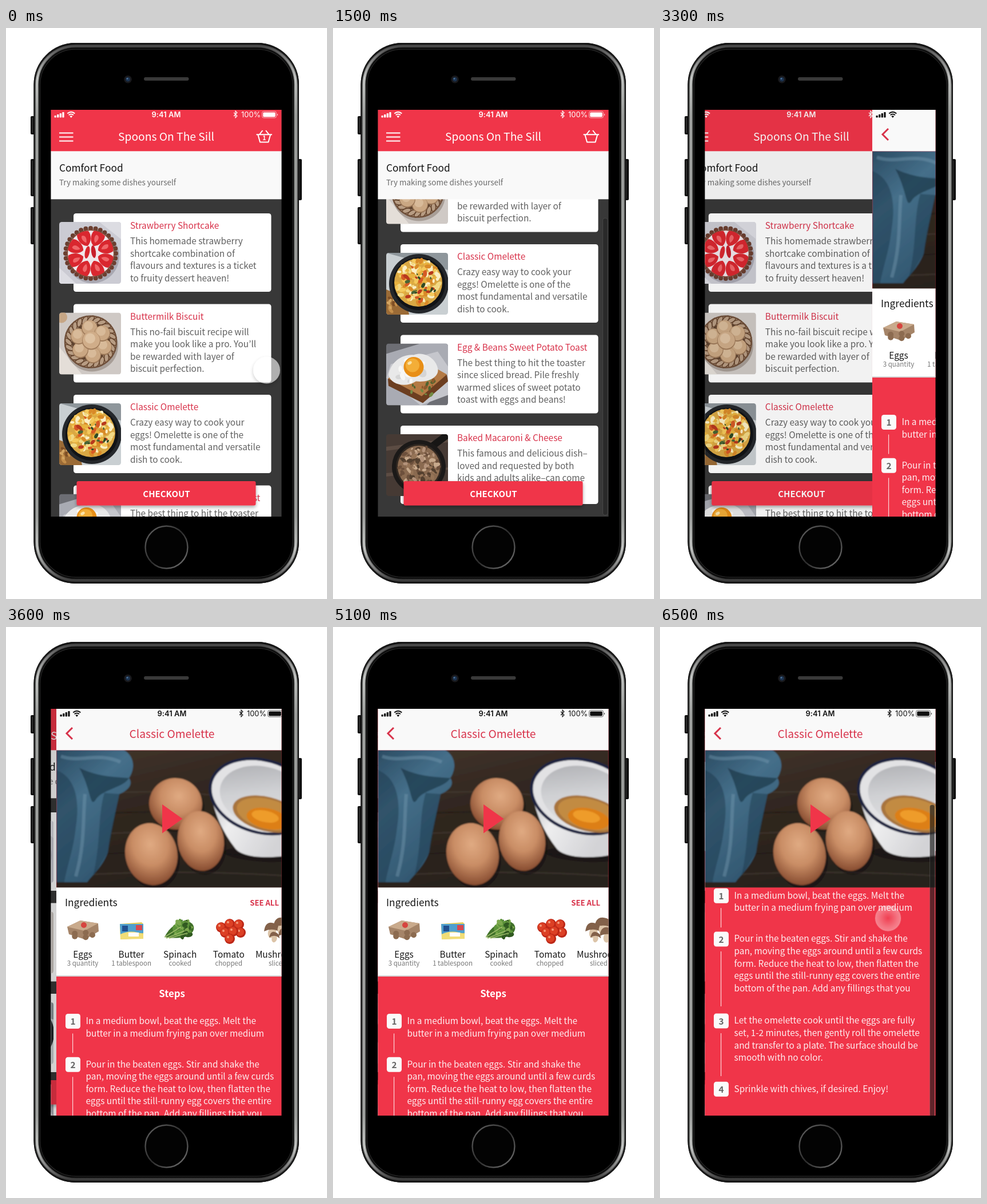
Animation of 561x998 px, one loop 6600 ms. Source, as an HTML page:

```html
<!DOCTYPE html>
<html lang="en">
<head>
<meta charset="utf-8">
<title>Recipe app</title>
<style>
html,body{margin:0;width:100%;height:100%;overflow:hidden;background:#fff}
svg{display:block;width:561px;height:998px}
text{font-family:"Noto Sans CJK KR","Noto Sans CJK SC","Noto Sans CJK JP","Noto Sans CJK",sans-serif}
text.ui{font-family:Inter,"Liberation Sans",sans-serif}
</style>
</head>
<body>
<svg id="stage" viewBox="0 0 561 998" xmlns="http://www.w3.org/2000/svg"></svg>
<script>
const RED = '#f03549', TITLE = '#d8324a', BODY = '#606060', PALE = '#f9f9f9';
const PT = 0.962; // design points to pixels

let seed = 7;
const rnd = () => (seed = seed * 16807 % 2147483647) / 2147483647;

const rect = (x, y, w, h, fill, more = '') => `<rect x="${x}" y="${y}" width="${w}" height="${h}" fill="${fill}" ${more}/>`;
const circ = (x, y, r, fill, more = '') => `<circle cx="${x}" cy="${y}" r="${r}" fill="${fill}" ${more}/>`;
const oval = (x, y, a, b, fill, turn = 0, more = '') =>
  `<ellipse cx="${x}" cy="${y}" rx="${a}" ry="${b}" fill="${fill}" transform="rotate(${turn} ${x} ${y})" ${more}/>`;
const path = (d, fill, more = '') => `<path d="${d}" fill="${fill}" ${more}/>`;
const line = (d, color, w, more = '') => path(d, 'none', `stroke="${color}" stroke-width="${w}" ${more}`);
const text = (x, y, s, pt, fill, more = '') =>
  `<text x="${x}" y="${y}" font-size="${(pt * PT).toFixed(2)}" fill="${fill}" ${more}>${s.replace(/&/g, '&amp;')}</text>`;
const group = (body, more = '') => `<g ${more}>${body}</g>`;
const stops = list => list.map(([o, c]) => `<stop offset="${o}" stop-color="${c}"/>`).join('');
const MID = 'text-anchor="middle" ', BOLD = 'font-weight="600" ';

// random flecks inside a disc
function flecks(n, cx, cy, r, colors, size) {
  let out = '';
  for (let i = 0; i < n; i++) {
    const a = rnd() * 6.283, d = Math.sqrt(rnd()) * r, s = size * (0.5 + rnd());
    out += oval((cx + d * Math.cos(a)).toFixed(1), (cy + d * Math.sin(a)).toFixed(1),
      s.toFixed(1), (s * 0.6).toFixed(1), colors[i % colors.length], Math.round(rnd() * 180));
  }
  return out;
}

function ring(n, cx, cy, r, draw, start = 0) {
  let out = '';
  for (let i = 0; i < n; i++) {
    const a = start + i * 6.2832 / n;
    out += draw(+(cx + r * Math.cos(a)).toFixed(1), +(cy + r * Math.sin(a)).toFixed(1), a * 57.3);
  }
  return out;
}

const thumbs = [
  () => rect(0, 0, 108, 108, '#cbcbd3') + path('M0 80L30 108H0zM70 0H108V30z', '#dcdce2') +
    oval(58, 60, 47, 47, '#a9a8b2') + ring(32, 55, 55, 44, (x, y) => circ(x, y, 4, '#6b3f30')) +
    circ(55, 55, 42, '#7d4a38') + circ(55, 55, 40, '#f0e6ea') +
    ring(8, 55, 55, 26, (x, y, a) => group(
      path('M-12 0C-9 -9 4 -14 13 -10C15 -3 15 4 12 11C4 14 -8 9 -12 0z', '#d9272f') +
      path('M-6 0C-2 -5 5 -6 8 -3C8 2 3 5 -6 0z', '#f0676a'),
      `transform="translate(${x} ${y}) rotate(${a.toFixed(0)})"`), 0.4) +
    oval(49, 53, 4, 11, '#d9272f', 12) + oval(60, 52, 4, 11, '#c71f2b', -8),
  () => rect(0, 0, 108, 108, '#cfc9c5') + path('M0 60L40 108H0z', '#e4ded8') + circ(4, 8, 10, '#c6a685') +
    oval(57, 58, 46, 45, '#a89e97') + circ(55, 51, 45, '#b79c83') +
    ring(24, 55, 51, 39, (x, y, a) => oval(x, y, 8, 4, 'none', a + 45, 'stroke="#66462f" stroke-width="1.6"')) +
    circ(55, 51, 45, 'none', 'stroke="#70503a" stroke-width="2.4"') + circ(55, 51, 33, '#5f432f') +
    ring(6, 56, 50, 24, (x, y) => circ(x, y + 1, 14, '#9c7858') + circ(x, y, 13, '#caa783') + circ(x - 2, y - 3, 8, '#d8ba99'), 0.4) +
    circ(56, 49, 16, '#a17c5b') + circ(56, 48, 15, '#d0ad89') + circ(54, 45, 9, '#dec2a2'),
  () => rect(0, 0, 108, 108, '#c9cfd2') + path('M0 0H108V30z', '#8e969b') + path('M0 64L34 78L40 108H0z', '#9b6b36') +
    flecks(18, 14, 92, 15, ['#c58f4b', '#7f4f25', '#d4a562'], 4) +
    circ(57, 54, 52, '#24272b') + circ(57, 54, 46, '#111316') + circ(56, 52, 42, '#d9a844') +
    flecks(150, 56, 52, 39, ['#f2d984', '#e8b33f', '#fbefc4', '#d98a28', '#f4c95c'], 4.5) +
    flecks(18, 58, 52, 32, ['#b8391d', '#d65a25'], 4) + flecks(14, 62, 58, 28, ['#2f4a24', '#486534'], 3.3),
  () => rect(0, 0, 108, 108, '#6d6e74') + path('M0 18L60 0H108V70L70 108H0z', '#a9abb3') + path('M0 60L8 36L90 14L108 40V90L60 108z', '#c5c6cc') +
    path('M3 62L60 30L106 55L108 66L64 104L4 74z', '#6c3e20') + path('M3 61L60 28L106 54L62 92z', '#b47a45') +
    flecks(24, 62, 72, 25, ['#728a43', '#8d5b2c', '#4f6430'], 4) +
    path('M4 55C8 32 28 18 48 20C70 12 88 30 90 43C94 58 74 69 52 66C34 78 8 72 4 55z', '#e9e9e9') +
    flecks(20, 44, 46, 25, ['#f8f8f6', '#d5d5d5'], 5) + circ(48, 41, 17.5, '#e88f17') + circ(46, 38, 12, '#f3ae38') + oval(41, 34, 4, 2.5, '#fbe2a6', -30),
  () => rect(0, 0, 108, 108, '#463a34') + path('M0 22L108 8V14L0 29zM0 68L108 58V62L0 74z', '#5c4c43') +
    path('M84 26L108 8V0H98L74 18z', '#171615') + circ(57, 57, 47, '#1b1918') + circ(57, 57, 40, '#312821') + circ(57, 57, 37, '#8a6a50') +
    flecks(120, 57, 57, 35, ['#b3927a', '#6d503c', '#c7a98c', '#967457', '#54402f'], 4)
];

const recipes = [
  ['Strawberry Shortcake', 'This homemade strawberry|shortcake combination of|flavours and textures is a ticket|to fruity dessert heaven!'],
  ['Buttermilk Biscuit', 'This no-fail biscuit recipe will|make you look like a pro. You’ll|be rewarded with layer of|biscuit perfection.'],
  ['Classic Omelette', 'Crazy easy way to cook your|eggs! Omelette is one of the|most fundamental and versatile|dish to cook.'],
  ['Egg & Beans Sweet Potato Toast', 'The best thing to hit the toaster|since sliced bread. Pile freshly|warmed slices of sweet potato|toast with eggs and beans!'],
  ['Baked Macaroni & Cheese', 'This famous and delicious dish–|loved and requested by both|kids and adults alike–can come|together in every pot.']
];

const lines = (x, y, s, fill) => s.split('|').map((l, i) => text(x, y + i * 21.55, l, 16, fill)).join('');

const card = ([name, words], i) => group(
  rect(118, 0, 345.5, 137, '#fff', 'rx="4.5"') +
  group(thumbs[i](), 'transform="translate(93 15)" clip-path="url(#thumb)"') +
  text(217, 27, name, 16, TITLE) + lines(217, 54, words, BODY),
  `transform="translate(0 ${324 + i * 158.5})"`);

function status(c) {
  const bars = [0, 1, 2, 3].map(i => rect(84.5 + i * 4.6, 153 - i * 2, 3.3, 3.5 + i * 2, c, 'rx=".8"')).join('');
  const ui = (x, s, more) => `<text class="ui" x="${x}" y="155.6" font-size="12.9" fill="${c}" ${more}>${s}</text>`;
  return bars +
    line('M107.3 149.6Q113.8 143.8 120.3 149.6M109.7 152.3Q113.8 148.8 117.9 152.3', c, 2) +
    path('M111.4 154.3Q113.8 152.3 116.2 154.3L113.8 157z', c) +
    ui(280, '9:41 AM', MID + 'font-weight="600" letter-spacing=".1"') +
    line('M398 147.8L404 153.8L401 156.8V145L404 148L398 154', c, 1.1) +
    ui(411, '100%', 'font-weight="400"') +
    rect(447.5, 145.7, 25, 11.4, 'none', `rx="3" stroke="${c}" stroke-opacity=".6"`) +
    rect(449.2, 147.4, 21.6, 8, c, 'rx="1.6"') + path('M474 149.4Q476 151.4 474 153.4z', c);
}

const bar = (id, h) => rect(471.5, 143, 8.5, h, '#1c1c1c', `id="${id}" rx="3.5" fill-opacity=".68" stroke="#fff" stroke-opacity=".14"`);

const listPage = () =>
  rect(78, 143, 404, 711, '#383838') +
  group(recipes.map(card).join(''), 'id="cards"') +
  rect(123.5, 792, 313, 42.5, RED, 'rx="3" filter="url(#lift)"') +
  text(280.5, 820, 'CHECKOUT', 15.6, '#fff', MID + BOLD) +
  rect(78, 215, 404, 84.3, PALE) + text(93, 251, 'Comfort Food', 18, '#111') +
  text(93, 274.6, 'Try making some dishes yourself', 14, '#6a6a6a') +
  rect(78, 143, 404, 72.3, RED) + status('#fff') +
  line('M93 183.5H117.5M93 190.5H117.5M93 197.5H117.5', '#fff', 2) +
  text(280, 197, 'Spoons On The Sill', 20, '#fff', MID) +
  line('M437.5 186.3H465M440.5 187L444 199.6H458.5L462 187M443 186L448.5 179M459.5 186L454 179', '#fff', 2, 'stroke-linejoin="round"') +
  text(451.3, 196, '1', 11, '#fff', MID + BOLD + 'id="count"') + bar('listBar', 519);

const egg = (x, y, a, b, turn) => oval(x + 4, y + 7, a, b, '#17110e', turn, 'opacity=".5"') + oval(x, y, a, b, 'url(#egg)', turn);

const wood = () => rect(78, 215, 404, 241, 'url(#wood)') +
  [0, 1, 2, 3, 4, 5].map(i => line(`M78 ${300 + i * 34}Q280 ${270 + i * 38} 482 ${315 + i * 30}`, i % 2 ? '#1b1614' : '#4d4138', 2.5, 'opacity=".5"')).join('');

const cloth = () =>
  path('M78 215H196C212 224 218 244 205 264C213 275 203 286 188 292C180 330 172 360 168 394C158 420 142 432 132 446L78 446z', 'url(#cloth)') +
  path('M78 250C110 262 120 300 112 350C108 390 96 420 92 446H78z', '#1f3c51', 'opacity=".55"') +
  path('M118 246C150 262 180 262 205 264C196 280 160 284 148 300C136 320 140 286 118 246z', '#17303f', 'opacity=".6"') +
  path('M162 290C150 330 156 380 142 436L168 394L188 292z', '#1f3c51', 'opacity=".5"') +
  line('M86 226C120 238 150 218 190 236M128 292C124 340 128 380 112 436', '#7b9db3', 6, 'opacity=".4"');

const bowl = () =>
  path('M348 280C350 325 372 362 390 386C402 404 450 405 482 399V290z', 'url(#china)') +
  oval(437, 296, 92, 63, '#e2e2e4', 16, 'stroke="#1c2340" stroke-width="5"') +
  oval(442, 299, 80, 54, 'url(#well)', 16) +
  oval(446, 327, 61, 30, '#a8753c', 14) + oval(447, 327, 55, 26, '#c28b43', 14) +
  oval(447, 335, 37, 18, '#dd7f17', 12) + oval(443, 331, 24, 10, '#ee9c2a', 12);

const photo = () => group(
  group(wood() + cloth() + oval(436, 398, 66, 12, '#14100e', 4, 'opacity=".6"') +
    egg(286.5, 309, 46.5, 45, 15) + egg(244, 397, 45.5, 54.5, -12) + egg(330.5, 374, 40.5, 52.5, -8) + bowl(), 'filter="url(#soft)"'),
  'clip-path="url(#photo)"') + path('M263 310L298.5 335.3L263 360.5z', RED);

const items = [
  ['Eggs', '3 quantity', () => path('M97 524L120 513L151 518L152 532L128 546L100 537z', '#a58468') +
    path('M97 524L120 513L151 518L127 531z', '#c9aa8c') + ring(5, 124, 537, 17, (x, y) => oval(x, y * .25 + 404, 5, 5, '#8c6b50')) + circ(126, 521, 5, '#d6453f')],
  ['Butter', '1 tablespoon', () => path('M189 519L227 516L230 519V544L190 546z', '#e9cf58') + path('M189 519L230 519V535L190 537z', '#4f9fce') +
    path('M190 537Q208 528 230 537V545L190 546z', '#f1dd77') + rect(193, 522, 10, 10, '#21508f') + rect(217, 521, 11, 9, '#d84850') + rect(204, 534, 18, 7, '#fff')],
  ['Spinach', 'cooked', () => path('M267 542C276 524 289 516 305 514C319 516 322 528 314 535C300 546 280 544 267 542z', '#40702a') +
    flecks(42, 300, 527, 15, ['#5d943a', '#315a21', '#7ca84d'], 5) + line('M267 542L296 524M270 544L302 531M275 544L307 535', '#9dbb6a', 1.6)],
  ['Tomato', 'chopped', () => [[366, 525], [381, 519], [397, 520], [400, 534], [373, 534], [387, 532], [381, 545]].map(([x, y]) =>
    circ(x, y, 9, '#bd2717') + circ(x - 1, y - 1, 7, '#dc4025') + circ(x - 3, y - 3, 2, '#f49a7a')).join('')],
  ['Mushroom', 'sliced', () => [[455, 529, 14], [473, 522, 16], [480, 537, 14], [459, 540, 9]].map(([x, y, r]) =>
    oval(x, y + 5, r * .5, r * .7, '#dcc4a8', 20) + path(`M${x - r} ${y + 3}Q${x - r + 2} ${y - r} ${x} ${y - r + 2}Q${x + r} ${y - r + 4} ${x + r} ${y + 4}Q${x} ${y - 4} ${x - r} ${y + 3}z`, '#83614a')).join('')]
];

const steps = [
  [694, 34, 'In a medium bowl, beat the eggs. Melt the|butter in a medium frying pan over medium'],
  [769.8, 96, 'Pour in the beaten eggs. Stir and shake the|pan, moving the eggs around until a few curds|form. Reduce the heat to low, then flatten the|eggs until the still-runny egg covers the entire|bottom of the pan. Add any fillings that you'],
  [912.8, 75, 'Let the omelette cook until the eggs are fully|set, 1-2 minutes, then gently roll the omelette|and transfer to a plate. The surface should be|smooth with no color.'],
  [1032, 0, 'Sprinkle with chives, if desired. Enjoy!']
];

const step = ([y, len, words], i) =>
  rect(94, y - 18, 26, 26, '#fafafa', 'rx="4.5"') + text(107, y + 1.2, '' + (i + 1), 16, '#666', MID + BOLD) +
  (len ? rect(106, y + 16.5, 1.2, len, '#fff', 'opacity=".8"') : '') + lines(129.5, y, words, '#fdeef0');

const detailPage = () =>
  rect(78, 143, 404, 711, RED) +
  group(rect(78, 455, 404, 155, '#fff') + rect(78, 609, 404, 2, '#d4d0d1') +
    text(93, 488, 'Ingredients', 18, '#161616') + text(467, 487, 'SEE ALL', 13.6, TITLE, BOLD + 'text-anchor="end"') +
    items.map(([name, note, draw], i) => draw() + text(124 + i * 85.1, 577.8, name, 16, '#161616', MID) +
      text(124 + i * 85.1, 591.6, note, 12, '#777', MID)).join('') +
    text(280, 647, 'Steps', 17.5, '#fff', MID + BOLD) + steps.map(step).join(''), 'id="recipe"') +
  photo() + rect(78, 143, 404, 72.3, PALE) + status('#111') +
  line('M106 176L96 186L106 196', TITLE, 3) +
  text(280, 193.6, 'Classic Omelette', 20, TITLE, MID) + bar('detailBar', 545);

const button = (x, y, h) => rect(x, y, 8, h, '#111', 'rx="2"') + rect(x + 2.5, y + 3, 1, h - 6, '#4a4a4a');

// nested outlines shade the rounded metal edge
const rim = (inset, width, stroke) =>
  rect(48.5 + inset, 26 + inset, 463.5 - 2 * inset, 945 - 2 * inset, 'none', `rx="${73 - inset}" stroke="${stroke}" stroke-width="${width}"`);

const phone = () =>
  [[43, 154, 32], [43, 229, 65], [43, 313, 65], [509, 229, 72]].map(b => button(...b)).join('') +
  rect(48.5, 26, 463.5, 945, '#000', 'rx="73"') +
  rim(1, 2, '#161616') + rim(5.5, 7, 'url(#edge)') + rim(5.5, 4, 'url(#metal)') + rim(11, 1.4, '#262626') +
  rect(241, 86, 78.5, 6, '#393939', 'rx="3"') +
  circ(213, 89.7, 6.8, '#19191c') + circ(213, 89.7, 3.8, '#1c3350') + circ(212, 88.6, 1.4, '#52779c') +
  circ(280.5, 907.5, 37, '#030303', 'stroke="url(#home)" stroke-width="2.4"');

const defs = () => `<defs>
<clipPath id="screen"><rect x="78.5" y="143" width="403" height="711"/></clipPath>
<clipPath id="photo"><rect x="78" y="215" width="404" height="240.5"/></clipPath>
<clipPath id="thumb"><rect width="108" height="108" rx="4.5"/></clipPath>
<linearGradient id="edge" x2="0" y2="1">${stops([[0, '#1c1c1c'], [.02, '#303030'], [.08, '#5c5e5c'], [.92, '#5c5e5c'], [.98, '#303030'], [1, '#1c1c1c']])}</linearGradient>
<linearGradient id="metal" x2="0" y2="1">${stops([[0, '#4a4a4a'], [.02, '#777'], [.06, '#c4c6c4'], [.13, '#a0a2a0'], [.88, '#a0a2a0'], [.94, '#c4c6c4'], [.98, '#777'], [1, '#3c3c3c']])}</linearGradient>
<linearGradient id="home" x2="1" y2="1">${stops([[0, '#666'], [.5, '#2c2c2c'], [1, '#777']])}</linearGradient>
<linearGradient id="wood" x2=".4" y2="1">${stops([[0, '#43352c'], [.5, '#30261f'], [1, '#27221f']])}</linearGradient>
<linearGradient id="cloth" x2=".5" y2="1">${stops([[0, '#2a4b62'], [.4, '#456f8a'], [1, '#31566f']])}</linearGradient>
<linearGradient id="china" x2="1" y2=".5">${stops([[0, '#b9babd'], [.4, '#eeeeef'], [1, '#d3d3d6']])}</linearGradient>
<linearGradient id="well" x2=".6" y2="1">${stops([[0, '#a9aaae'], [.5, '#cfd0d3'], [1, '#e4e4e5']])}</linearGradient>
<radialGradient id="egg" cx=".52" cy=".34" r=".68">${stops([[0, '#e0aa82'], [.5, '#c98d65'], [1, '#84492e']])}</radialGradient>
<radialGradient id="halo"><stop offset="0" stop-color="#fff" stop-opacity="0"/><stop offset=".75" stop-color="#fff" stop-opacity=".8"/><stop offset="1" stop-color="#fff"/></radialGradient>
<filter id="lift" x="-20%" y="-20%" width="140%" height="170%"><feDropShadow dx="0" dy="3" stdDeviation="3" flood-opacity=".35"/></filter>
<filter id="soft"><feGaussianBlur stdDeviation="1"/></filter>
</defs>`;

const stage = document.getElementById('stage');
stage.innerHTML = defs() + phone() + group(
  group(listPage(), 'id="list"') + rect(78, 143, 404, 711, '#000', 'id="dim"') + group(detailPage(), 'id="detail"') +
  group(circ(0, 0, 23.5, '#fff', 'id="dot" filter="url(#lift)"') + circ(0, 0, 22.5, 'url(#halo)', 'id="halo_dot"'), 'id="finger"'),
  'clip-path="url(#screen)"');

// eased value of a [time, value] track
function at(track, t) {
  const i = track.findIndex(k => k[0] > t);
  if (i < 0) return track[track.length - 1][1];
  if (!i) return track[0][1];
  const [t0, a] = track[i - 1], [t1, b] = track[i], u = (t - t0) / (t1 - t0);
  return a + (b - a) * u * u * (3 - 2 * u);
}

const listScroll = [[100, 0], [1105, 263], [2600, 263], [3170, 0]];
const recipeScroll = [[5800, 0], [6420, 219.3]];
const listBarShow = [[0, 0], [200, 1], [1400, 1], [1700, 0], [2500, 0], [2650, 1], [3200, 1], [3350, 0]];
const detailBarShow = [[3750, 0], [3950, 1], [4700, 1], [5000, 0], [5800, 0], [5950, 1]];
const press = [[0, .6], [800, .5], [1050, 0], [2400, 0], [2600, .87], [3150, .87], [3300, 0], [5600, 0], [5800, .5], [6300, .5], [6550, 0]];
const halo = [[6200, 0], [6450, .36]];

const $ = id => document.getElementById(id);
const set = (id, name, v) => $(id).setAttribute(name, v);
const move = (id, x, y) => set(id, 'transform', `translate(${x.toFixed(2)} ${y.toFixed(2)})`);

function fingerAt(t, s, r) {
  if (t < 2000) return [455.5 + s * .01, 598 - s * 1.044];
  if (t < 4500) return [427, 689.5 - s];
  return [388 + r * .048, 755 - r * 1.122];
}

function draw(t) {
  const s = at(listScroll, t), r = at(recipeScroll, t);
  const left = Math.pow(1 - Math.min(1, Math.max(0, (t - 3250) / 494)), 3);
  move('cards', 0, -s);
  move('recipe', 0, -r);
  move('list', -121 * (1 - left), 0);
  move('detail', 403.5 * left, 0);
  set('dim', 'opacity', .18 * (1 - left));
  set('count', 'opacity', t < 100 ? 1 : 0);
  move('listBar', 0, s * .72);
  set('listBar', 'opacity', at(listBarShow, t));
  move('detailBar', 0, r * .765);
  set('detailBar', 'opacity', at(detailBarShow, t));
  move('finger', ...fingerAt(t, s, r));
  set('dot', 'opacity', at(press, t));
  set('halo_dot', 'opacity', at(halo, t));
}

const LOOP = 6600, TICK = 100, begin = performance.now();
function run() {
  const t = (performance.now() - begin) % LOOP;
  draw(Math.floor(t / TICK) * TICK);
  requestAnimationFrame(run);
}
run();
</script>
</body>
</html>
```
